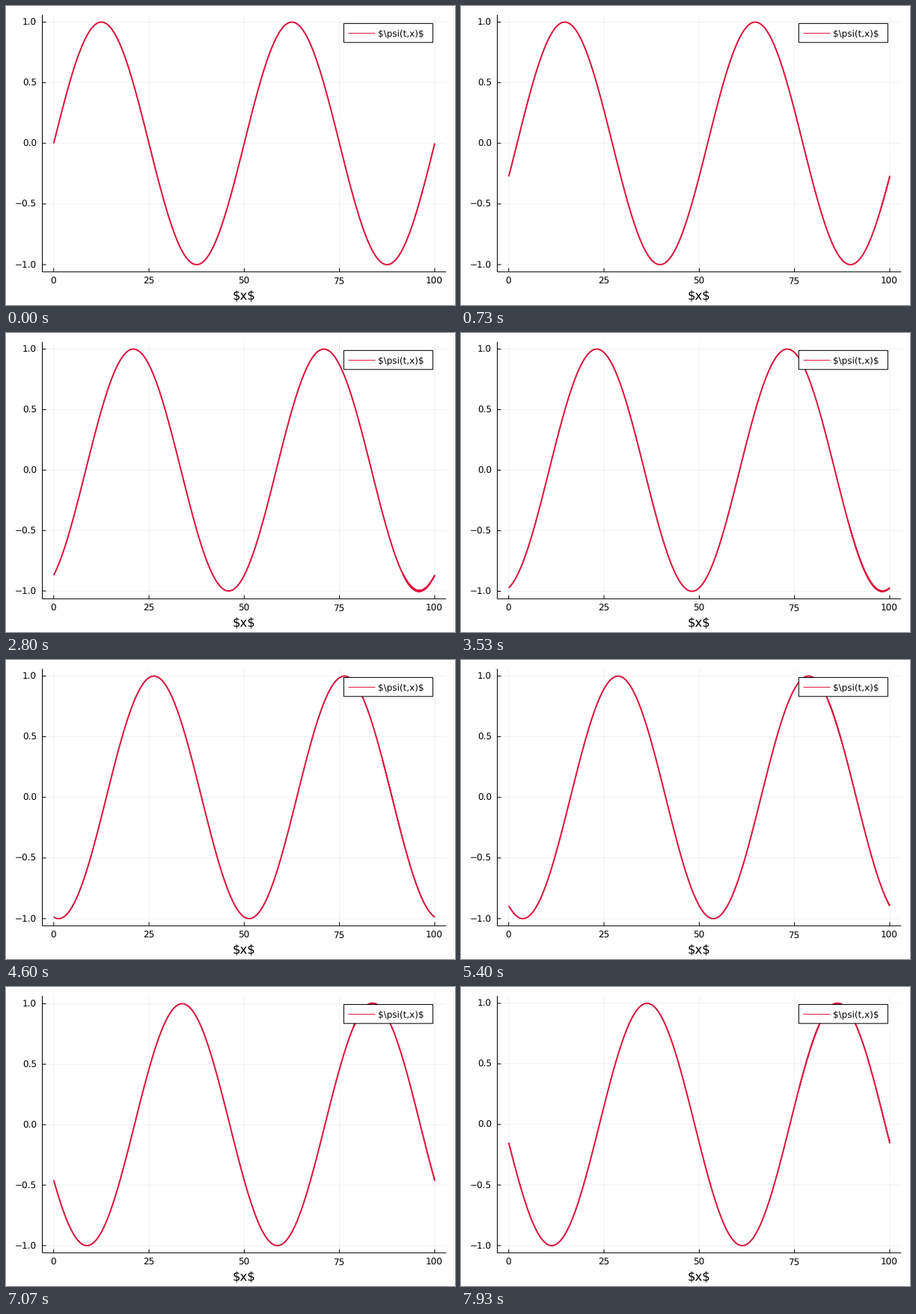
Animation, 600 px wide and 400 px high, one loop 8000 ms. Source, as a matplotlib script:

```python
import matplotlib.pyplot as plt
import numpy as np
from matplotlib.animation import FuncAnimation
from matplotlib.patches import Rectangle

W, H, DPI = 600, 400, 100
LOOP, TICK = 8000, 20              # ms
STEPS = 120                        # wave steps per loop
PX = 72 / DPI                      # one pixel in points
LEFT, RIGHT, TOP, BOTTOM = 48.5, 588.2, 11.8, 355.7
CRIMSON = "#DC143C"
K = 2 * np.pi / 50                 # wave number
SHIFT = 0.2                        # travel per step
DX = 0.1

plt.rcParams.update({
    "font.family": "DejaVu Sans",
    "text.parse_math": False,
    "text.hinting": "none",
    "path.simplify": False,
    "path.snap": False,
})

x = np.arange(1001) * DX
zigzag = np.where(np.arange(x.size) % 2, -1.0, 1.0)


def wave(step):
    """Wave moving right, with a grid-scale ripple reflected at x = 100."""
    s = SHIFT * step
    age = s - (100 - x)
    ripple = np.where(age > 0, DX * K / 2 * np.cos(K * age), 0)
    return np.sin(K * (x - s)) + zigzag * ripple


def px(v):
    return LEFT + (v + 3) / 106 * (RIGHT - LEFT)


def py(v, lo, hi):
    return BOTTOM - (v - lo) / (hi - lo) * (BOTTOM - TOP)


def limits(y):
    lo, hi = y.min(), y.max()
    pad = 0.03 * (hi - lo)
    return lo - pad, hi + pad


fig = plt.figure(figsize=(W / DPI, H / DPI), dpi=DPI, facecolor="white")
ax = fig.add_axes([0, 0, 1, 1])
ax.set(xlim=(0, W), ylim=(H, 0))
ax.axis("off")


def stroke(xs, ys, color="black", width=1, **kw):
    kw.setdefault("solid_capstyle", "butt")
    return ax.plot(xs, ys, color=color, lw=width * PX, **kw)[0]


def label(xp, yp, text, size=12, ha="center", **kw):
    return ax.text(xp, yp, text, fontsize=size * PX, ha=ha, va="baseline", **kw)


GRID = dict(color="black", width=0.5, alpha=0.1, zorder=1)

for v in range(0, 101, 25):
    stroke([px(v)] * 2, [TOP, BOTTOM], **GRID)
    stroke([px(v)] * 2, [BOTTOM, BOTTOM - 5], zorder=2)
    label(px(v) - 0.5, 371.4, str(v))

rows = []
for v in (-1.0, -0.5, 0.0, 0.5, 1.0):
    rows.append((v,
                 stroke([LEFT, RIGHT], [0, 0], **GRID),
                 stroke([LEFT, LEFT + 5], [0, 0], zorder=2),
                 label(40.8, 0, f"{v:.1f}".replace("-", "\u2212"), ha="right")))

stroke([LEFT, LEFT], [TOP, BOTTOM], zorder=2)
stroke([LEFT, RIGHT], [BOTTOM, BOTTOM], zorder=2)
label(318.2, 393, "$x$", size=16.5)

curve = stroke(px(x), 0 * x, CRIMSON, 2, zorder=3, solid_joinstyle="round")

ax.add_patch(Rectangle((451.4, 23.4), 119, 25.4, fc="white", ec="black",
                       lw=PX, zorder=4))
stroke([457.5, 493.5], [36.4, 36.4], CRIMSON, 1, zorder=5)
label(497.4, 40.8, r"$\psi(t,x)$", ha="left", zorder=5)


def update(frame):
    # Each step starts on the nearest tick.
    step = int((frame * TICK + 13.4) * STEPS / LOOP)
    y = wave(step)
    lo, hi = limits(y)
    curve.set_ydata(py(y, lo, hi))
    for v, grid, tick, text in rows:
        yp = py(v, lo, hi)
        grid.set_ydata([yp, yp])
        tick.set_ydata([yp, yp])
        text.set_y(yp + 4.4)
    return [curve]


anim = FuncAnimation(fig, update, frames=LOOP // TICK, interval=TICK,
                     init_func=lambda: update(0), repeat=True, repeat_delay=0)
plt.show()
```
